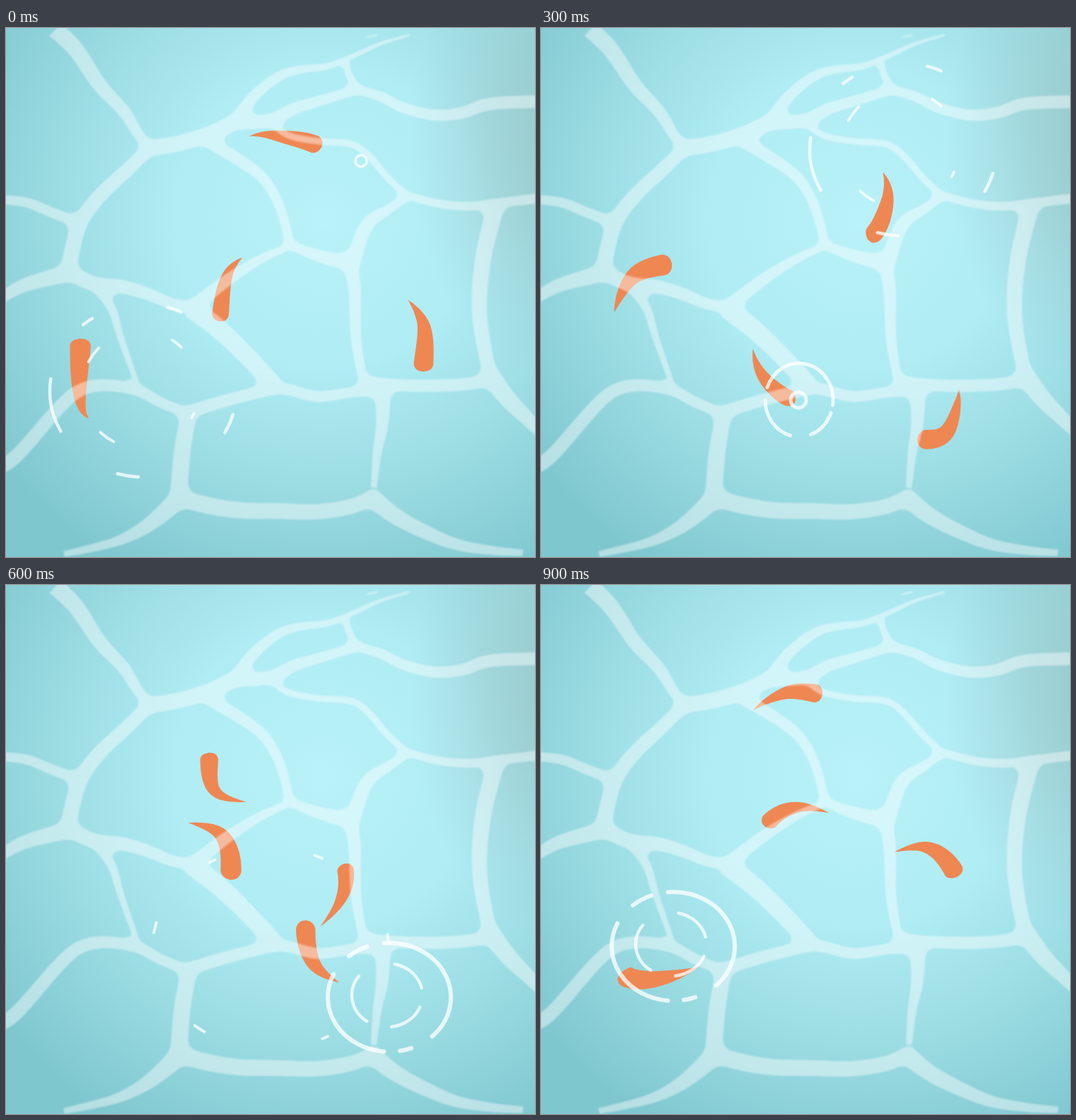
Write an HTML page that moves like this. It is 748x748 px and loops after 1 s.

```html
<!DOCTYPE html>
<html lang="en">
<head>
<meta charset="utf-8">
<title>Pond</title>
<style>
html, body { margin: 0; width: 100%; height: 100%; overflow: hidden; background: #8bd1d8; }
svg { display: block; width: 100%; height: 100%; }
.step { opacity: 0; animation: show 1s step-end infinite; }
@keyframes show { 0% { opacity: 1; } 10%, 100% { opacity: 0; } }
#fish { fill: #ef8753; }
#net { fill: #fff; opacity: .43; }
#ripples { fill: none; stroke: #fff; stroke-linecap: round; stroke-opacity: .76; }
</style>
</head>
<body>
<svg viewBox="0 0 748 748">
  <defs>
    <radialGradient id="water" gradientUnits="userSpaceOnUse" cx="450" cy="270" r="570">
      <stop offset="0" stop-color="#b9f2f8"/>
      <stop offset=".38" stop-color="#afecf4"/>
      <stop offset=".7" stop-color="#99dae1"/>
      <stop offset="1" stop-color="#7fc7cf"/>
    </radialGradient>
    <radialGradient id="shade" gradientUnits="userSpaceOnUse" cx="0" cy="0" r="1"
      gradientTransform="translate(800 160) scale(230 340)">
      <stop offset="0" stop-color="#98c4c4" stop-opacity=".9"/>
      <stop offset="1" stop-color="#98c4c4" stop-opacity="0"/>
    </radialGradient>
    <!-- Rounds the corners where veins meet, then softens the edges -->
    <filter id="melt" filterUnits="userSpaceOnUse" x="-30" y="-30" width="808" height="808">
      <feGaussianBlur stdDeviation="8"/>
      <feComponentTransfer result="joined"><feFuncA type="linear" slope="12" intercept="-5.5"/></feComponentTransfer>
      <feMerge><feMergeNode in="joined"/><feMergeNode in="SourceGraphic"/></feMerge>
      <feGaussianBlur stdDeviation="1.3"/>
    </filter>
  </defs>
  <rect width="748" height="748" fill="url(#water)"/>
  <rect width="748" height="748" fill="url(#shade)"/>
  <g id="fish"></g>
  <g id="net" filter="url(#melt)"></g>
  <g id="ripples"></g>
</svg>
<script>
const STEPS = 10;
const byId = id => document.getElementById(id);
const points = s => s.split(' ').map(p => p.split(',').map(Number));

function add(parent, tag, attrs) {
  const el = document.createElementNS('http://www.w3.org/2000/svg', tag);
  for (const k in attrs) el.setAttribute(k, attrs[k]);
  return parent.appendChild(el);
}

// Point of a smooth curve through the keys; u = 0 is the first key, 1 the second
function along(keys, u, closed) {
  const n = keys.length, i = Math.floor(u), t = u - i;
  const key = j => keys[closed ? (j + 2 * n) % n : Math.max(0, Math.min(n - 1, j))];
  const [a, b, c, d] = [key(i - 1), key(i), key(i + 1), key(i + 2)];
  return [0, 1].map(k => b[k] + t / 2 * (c[k] - a[k] +
    t * (2 * a[k] - 5 * b[k] + 4 * c[k] - d[k] + t * (3 * (b[k] - c[k]) + d[k] - a[k]))));
}

// Outline of a band around a line; half(s) is its half width at share s
function band(line, half) {
  const left = [], right = [], last = line.length - 1;
  line.forEach(([x, y], i) => {
    const a = line[Math.max(0, i - 1)], b = line[Math.min(last, i + 1)];
    const dx = b[0] - a[0], dy = b[1] - a[1], k = half(i / last) / (Math.hypot(dx, dy) || 1);
    left.push([(x - dy * k).toFixed(1), (y + dx * k).toFixed(1)]);
    right.unshift([(x + dy * k).toFixed(1), (y - dx * k).toFixed(1)]);
  });
  return 'M' + [...left, ...right].join('L') + 'Z';
}

// Light vein whose width goes evenly from w0 to w1
function vein(w0, w1, text) {
  const keys = points(text), count = (keys.length - 1) * 12;
  const line = Array.from({ length: count + 1 }, (_, i) => along(keys, i / 12, false));
  add(byId('net'), 'path', { d: band(line, s => (w0 + (w1 - w0) * s) / 2) });
}

// Top
vein(25, 12, '70,2 100,32 132,80 167,118 187,150 204,170');
vein(22, 22, '203,170 245,163 290,149 327,131');
vein(18, 3, '322,135 350,97 385,69 415,59 455,54 490,40 530,22 571,10');
vein(20, 13, '322,134 372,131 407,114 440,104 497,87');
vein(9, 11, '480,45 485,66 497,87');
vein(13, 18, '495,87 530,97 560,112 605,123 645,120 685,107 760,104');
vein(2, 3, '510,13 525,10');
// Left
vein(18, 22, '205,168 170,202 130,240 103,280 88,340');
vein(13, 15, '-10,242 30,247 65,261 100,274');
vein(15, 24, '-10,384 20,366 55,355 92,346');
vein(22, 14, '90,346 125,362 165,366 200,376 235,390 268,395');
vein(15, 7, '130,368 150,398 163,440 187,508');
// Middle
vein(18, 12, '285,160 330,187 365,214 388,255 402,308');
vein(9, 10, '375,135 400,152 440,160 487,164 512,180 540,212 568,238');
vein(9, 20, '402,308 360,327 315,355 262,396');
vein(11, 24, '400,306 430,318 465,328 488,330');
vein(10, 22, '568,238 540,257 510,279 489,335');
vein(20, 12, '486,330 493,370 495,440 505,500');
vein(28, 24, '262,396 300,425 335,458 380,505');
// Right
vein(11, 14, '565,236 610,248 655,252 700,247 760,240');
vein(24, 19, '693,250 674,330 670,410 685,495');
vein(28, 16, '682,488 710,525 735,550 760,575');
vein(16, 18, '500,498 540,504 600,506 655,503 688,495');
// Bottom
vein(20, 14, '-10,622 17,603 75,537 105,512 140,505 185,512 220,530 258,545');
vein(18, 14, '255,544 300,530 345,518 390,510 440,521 490,515 533,513');
vein(22, 8, '533,512 532,560 525,600 520,650');
vein(22, 24, '258,548 249,600 244,664');
vein(28, 8, '250,660 220,688 190,710 150,728 82,744');
vein(24, 20, '240,663 285,675 330,682 385,683 440,684 490,676 520,662');
vein(26, 9, '515,662 550,690 598,715 640,731 690,739 731,742');

// Each fish swims a closed course, one key per step, its body trailing along it
const school = [
  [104, 13, '446,169 483,203 489,248 462,299 395,310 301,296 287,237 292,186 345,153 398,155'],
  [100, 12, '302,415 301,462 320,500 360,526 411,512 470,451 478,394 437,338 367,314 317,342'],
  [108, 14, '590,486 589,530 571,574 532,581 475,564 434,533 424,474 442,408 537,370 588,413'],
  [116, 15, '105,439 104,400 132,350 185,333 237,333 304,353 317,417 286,495 202,548 113,548']
];

const girth = s => Math.sqrt(1 - Math.max(0, 1 - s / .12) ** 2) * (1 - s ** 1.9);

function trail(keys, u, length) {
  const line = [along(keys, u, true)];
  for (let run = 0; run < length;) {
    u -= .02;
    const p = along(keys, u, true), q = line[line.length - 1];
    run += Math.hypot(p[0] - q[0], p[1] - q[1]);
    line.push(p);
  }
  return line;
}

// Stages of a ripple: [centre x, centre y, radius x, radius y, line width, arcs in degrees]
const stages = [
  [[502, 188, 8, 8, 3.6, '0,359']],
  [[496, 175, 11, 11, 5, '0,359'], [497, 175, 48, 52, 5, '105,180 200,368 20,70']],
  [[505, 170, 87, 77, 6, '95,205 -95,46 229,249 69,80'],
   [502, 167, 50, 45, 4.5, '125,217 -78,-13 22,83']],
  [[512, 172, 132, 122, 4.5, '-130,-123 -75,-66 152,188 93,106 16,29'],
   [508, 170, 83, 83, 4, '-57,-46 208,225 117,133 24,29']],
  [[506, 163, 167, 142, 4, '-121,-118 -68,-64 189,195 -8,-3 124,130 61,64']]
];

// Drops: first step and place
const drops = [[0, 0, 0], [2, -132, 351], [4, 37, 413], [7, -318, 341]];

function arc(cx, cy, rx, ry, from, to) {
  const at = deg => {
    const a = deg * Math.PI / 180;
    return [cx + rx * Math.cos(a), cy + ry * Math.sin(a)];
  };
  return `M${at(from)}A${rx} ${ry} 0 ${to - from > 180 ? 1 : 0} 1 ${at(to)}`;
}

for (let i = 0; i < STEPS; i++) {
  const step = { class: 'step', style: `animation-delay:${i * 100 - 1000}ms` };
  const bodies = add(byId('fish'), 'g', step);
  for (const [length, half, course] of school)
    add(bodies, 'path', { d: band(trail(points(course), i, length), s => half * girth(s)) });

  const rings = add(byId('ripples'), 'g', step);
  for (const [first, x, y] of drops) {
    const stage = stages[(i - first + STEPS) % STEPS] || [];
    for (const [cx, cy, rx, ry, width, arcs] of stage) {
      const d = points(arcs).map(([from, to]) => arc(cx + x, cy + y, rx, ry, from, to)).join('');
      add(rings, 'path', { d, 'stroke-width': width });
    }
  }
}
</script>
</body>
</html>
```
